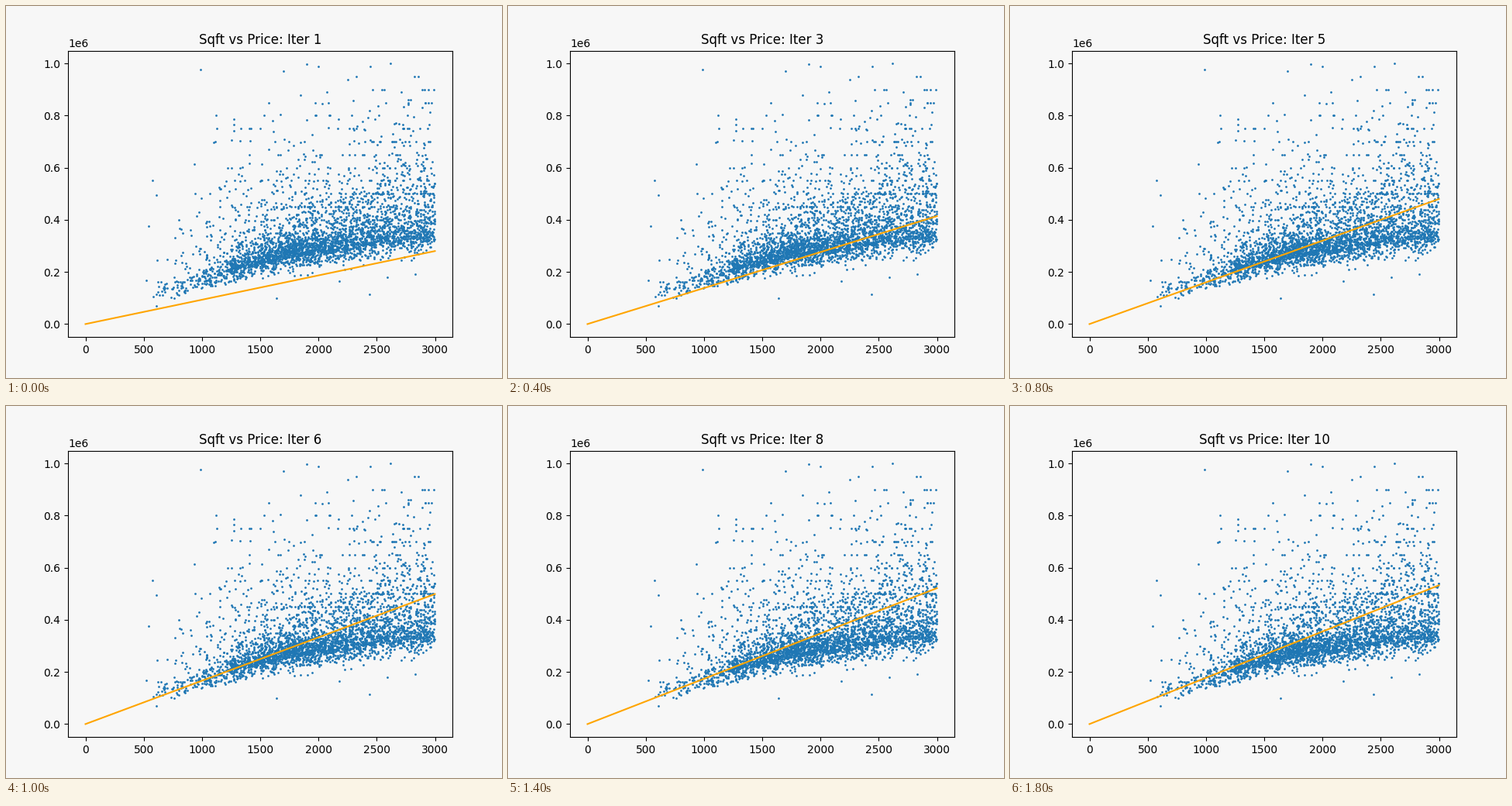
These frames come from a looping animation (640 by 480 pixels, 2400 ms). A matplotlib script:

```python
import numpy as np
import matplotlib.pyplot as plt
from matplotlib.animation import FuncAnimation

STEP_MS = 200
FRAMES = 12
LAST_ITER = 10
BG = "#f7f7f7"
MAX_SQFT, MAX_PRICE = 2999, .999

# Isolated homes that frame the cloud: (sqft, price in millions).
LONERS = [(520, .168), (545, .375), (578, .55), (605, .495), (608, .07),
          (988, .975), (1120, .80), (1640, .10), (1700, .97), (2000, .988),
          (2440, .113), (2617, MAX_PRICE)]


def cloud(n, seed=4):
    """Random homes: a tight core, an upper skew and a wide expensive tail."""
    rng = np.random.default_rng(seed)
    knots = [500, 1000, 1500, 2000, 2500, 3000]

    def by_size(*values):
        return np.interp(sqft, knots, values)

    sqft = np.interp(rng.random(n),
                     [0, .006, .028, .08, .185, .345, .505, .77, 1],
                     [560, 750, 1000, 1250, 1500, 1750, 2000, 2500, MAX_SQFT])
    mid = by_size(.11, .178, .247, .287, .316, .335)

    sigma = np.where(rng.random(n) < .06, .27, by_size(.2, .16, .125, .115, .1, .1))
    core = mid * np.exp(sigma * rng.normal(size=n))
    skew = .95 * mid + rng.exponential(by_size(.02, .03, .05, .09, .125, .14))
    wide = mid + .07 + rng.exponential(.2, n)

    p_wide = by_size(.25, .24, .13, .11, .14, .16)
    p_skew = by_size(.2, .2, .25, .36, .5, .6)
    kind = rng.random(n)
    price = np.select([kind < p_wide, kind < p_wide + p_skew], [wide, skew], core)

    # The dearer the home, the likelier a round price.
    rounded = rng.random(n) < np.interp(price, [.35, .4, .8], [0, .1, .4])
    price = np.where(rounded, np.round(price * 20) / 20, price)

    ceiling = np.interp(sqft, [500, 800, 1000, 1500, 1700], [.2, .45, .75, .87, MAX_PRICE])
    keep = (price < ceiling) & (price > .55 * mid)
    return sqft[keep], price[keep]


def fitted_price(step):
    """Price at the largest size after a number of gradient steps."""
    return (.543 - .3757 * .7 ** step) * 1e6


fig, ax = plt.subplots(figsize=(6.4, 4.8), dpi=100, facecolor=BG)
fig.subplots_adjust(left=.125, right=.9, bottom=.11, top=.88)
ax.set_facecolor(BG)
ax.set_xlim(-.05 * MAX_SQFT, 1.05 * MAX_SQFT)
ax.set_ylim(-.05e6 * MAX_PRICE, 1.05e6 * MAX_PRICE)

for sqft, price in (cloud(3650), np.transpose(LONERS)):
    ax.plot(sqft, price * 1e6, "o", color="C0", markersize=1)
fit, = ax.plot([0, MAX_SQFT], [0, 0], color="orange", lw=1.5, zorder=3)
title = ax.set_title("")


def draw(frame):
    step = min(frame + 1, LAST_ITER)
    fit.set_ydata([0, fitted_price(step)])
    title.set_text(f"Sqft vs Price: Iter {step}")
    return fit, title


anim = FuncAnimation(fig, draw, frames=FRAMES, interval=STEP_MS,
                     init_func=lambda: draw(0), repeat=True, repeat_delay=0)
plt.show()
```
